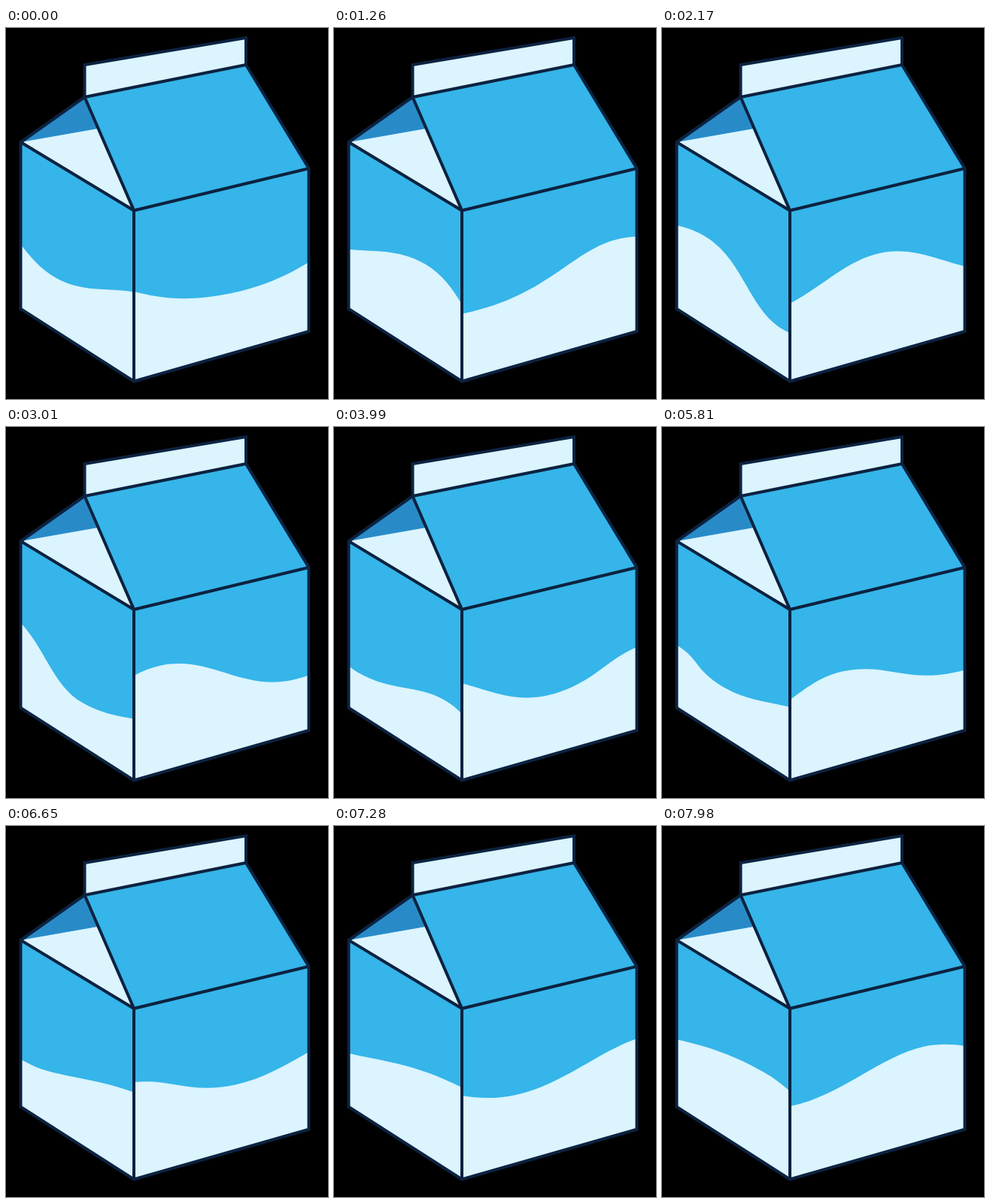
Recreate the animation shown at these times as an HTML page. Size 428 px wide and 494 px high, loop 8 s.

```html
<!DOCTYPE html>
<html lang="en">
<head>
<meta charset="utf-8">
<title>Milk carton</title>
<style>
  html, body { margin: 0; width: 100%; height: 100%; overflow: hidden; background: #000; }
  svg { display: block; }
  .blue { fill: #35b5e9; }
  .pale { fill: #dbf4fe; }
  .shade { fill: #288bc8; }
  .line { fill: none; stroke: #0c2240; stroke-width: 4; }
</style>
</head>
<body>
<svg width="428" height="494" viewBox="0 0 428 494">
  <clipPath id="leftFace"><path d="M19.5 152L170 243V470.5L19.5 374Z"/></clipPath>
  <clipPath id="rightFace"><path d="M170 243L402.5 187V404L170 470.5Z"/></clipPath>

  <path class="pale" d="M104.5 49L319 13V49L104.5 92Z"/>
  <path class="pale" d="M19.5 152L104.5 92L170 243Z"/>
  <path class="shade" d="M19.5 152L104.5 92L122 134Z"/>
  <path class="blue" d="M104.5 92L319 49L402.5 187V404L170 470.5L19.5 374V152L170 243Z"/>

  <g clip-path="url(#leftFace)"><path id="leftWave" class="pale"/></g>
  <g clip-path="url(#rightFace)"><path id="rightWave" class="pale"/></g>

  <path class="line" d="M104.5 92L319 49M104.5 92L170 243V470.5M19.5 152L170 243L402.5 187"/>
  <path class="line" d="M19.5 152L104.5 92V49L319 13V49L402.5 187V404L170 470.5L19.5 374Z"/>
</svg>
<script>
const LOOP = 8000, STEP = 70;

// Each face is a skewed plane on which a wave slides left (speed in px per second).
// A wave is its alternating crests and troughs: [x, y, length of the flat handles].
const waves = [
  {
    path: document.getElementById('leftWave'), skew: 30, speed: 71.4,
    turns: [
      [-44, 246.7, 50], [66, 294.4, 48], [211, 244.3, 52], [316, 308.5, 46],
      [431, 278.9, 36], [501, 299.1, 46], [705, 249.7, 93], [830, 340, 50]
    ]
  },
  {
    path: document.getElementById('rightWave'), skew: -12, speed: 100,
    turns: [
      [100, 366.7, 60], [300, 416.8, 112], [507, 361.3, 64], [681, 417.8, 67],
      [822, 376.6, 56], [970, 409.4, 66], [1146, 367.7, 56], [1300, 405, 60]
    ]
  }
];

function waveShape(turns) {
  const [startX, startY] = turns[0];
  let d = `M${startX},${startY}`;
  for (let i = 1; i < turns.length; i++) {
    const [x0, y0, h0] = turns[i - 1], [x1, y1, h1] = turns[i];
    d += `C${x0 + h0},${y0} ${x1 - h1},${y1} ${x1},${y1}`;
  }
  return `${d}V700H${startX}Z`;
}

for (const { path, turns } of waves) path.setAttribute('d', waveShape(turns));

function draw(now) {
  const t = Math.floor((now % LOOP) / STEP) * STEP / 1000;
  for (const { path, skew, speed } of waves) {
    path.setAttribute('transform', `skewY(${skew}) translate(${-speed * t})`);
  }
}

const start = performance.now();
function tick() {
  draw(performance.now() - start);
  requestAnimationFrame(tick);
}
tick();
</script>
</body>
</html>
```
